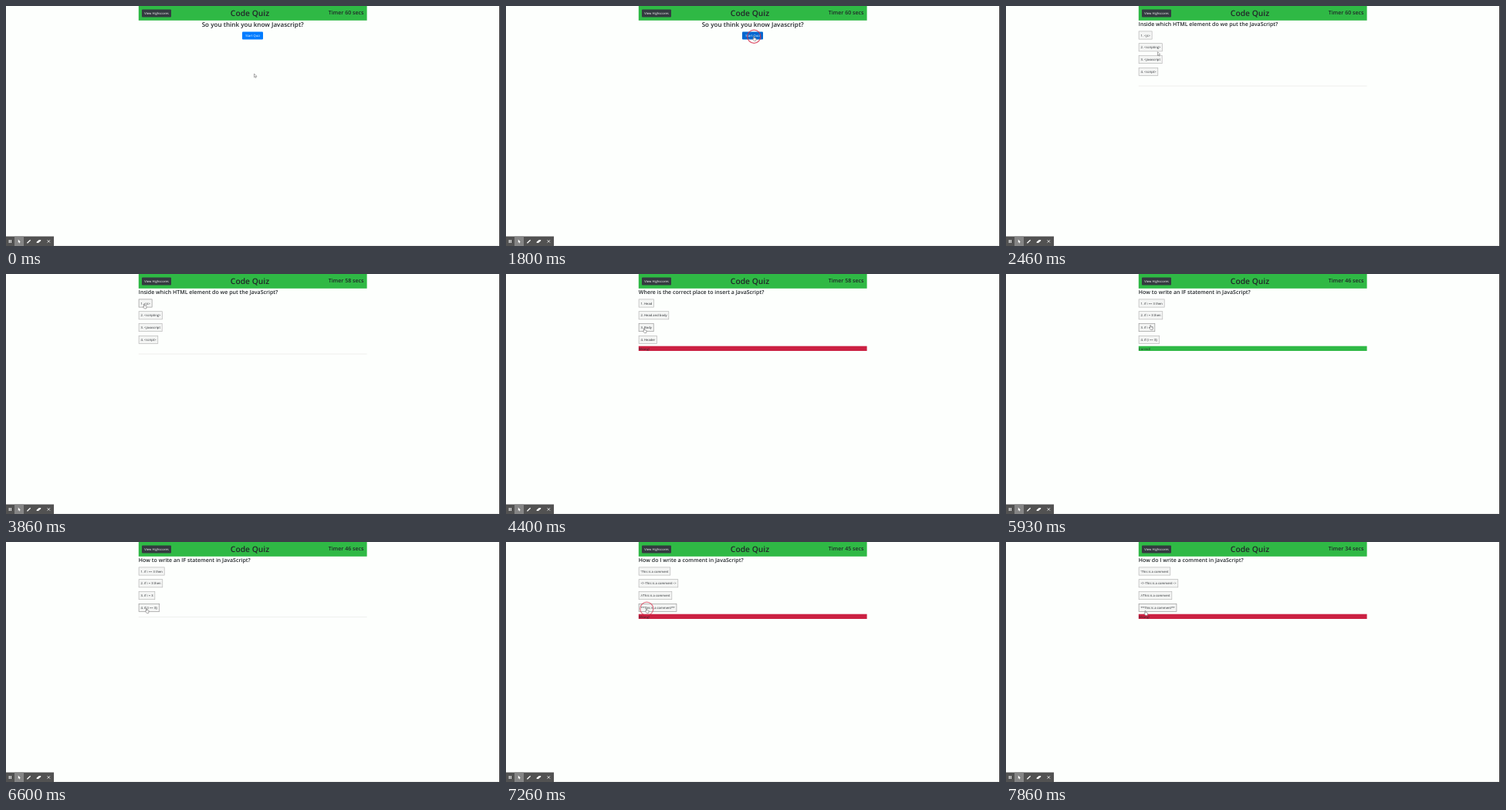
Recreate the animation shown at these times as an HTML page with a canvas. Size 640 by 312 pixels, loop 8000 ms.

```html
<!DOCTYPE html>
<html lang="en">
<head>
<meta charset="utf-8">
<title>Code Quiz</title>
<style>
html, body { margin: 0; width: 100%; height: 100%; overflow: hidden; background: #fdfffd; }
canvas { display: block; width: 640px; height: 312px; }
</style>
</head>
<body>
<canvas id="stage"></canvas>
<script>
const canvas = document.getElementById('stage');
const ctx = canvas.getContext('2d');
const ratio = window.devicePixelRatio || 1;
canvas.width = 640 * ratio;
canvas.height = 312 * ratio;

// Time is counted in ticks, 15 per second.
const RATE = 15;
const LOOP = 8 * RATE;
const LEFT = 171.8;
const WIDTH = 295.8;
const MID = 319.7;
const SMALL = 4.15;
const INK = '#212529';
const GREEN = '#2fb945';
const RED = '#cb2142';
const PAPER = '#fdfffd';

// Each page opens one tick after a click; "right" tells how that click was judged.
const pages = [
  { at: 0 },
  { at: 28, title: 'Inside which HTML element do we put the JavaScript?',
    choices: ['1. <js>', '2. <scripting>', '3. <javascript', '4. <script>'] },
  { at: 60, right: false, title: 'Where is the correct place to insert a JavaScript?',
    choices: ['1. Head', '2. Head and body', '3. Body', '4. Header'] },
  { at: 84, right: true, title: 'How to write an IF statement in JavaScript?',
    choices: ['1. if i == 3 then', '2. if i = 3 then', '3. if i = 3', '4. if (i == 3);'] },
  { at: 109, right: false, title: 'How do I write a comment in JavaScript?',
    choices: ["'This is a comment", '<!--This is a comment-->', '//This is a comment', '**This is a comment**'] }
];

const rowTop = i => 32.6 + 15.8 * i;
const rowMid = i => rowTop(i) + 6.6;

const moves = [
  { at: 0, len: 8, x: 321, y: 39.5 },
  { at: 29, len: 10, x: 182, y: 62 },
  { at: 39, len: 4, x: 179, y: rowMid(0) },
  { at: 60, len: 6, x: 179, y: rowMid(2) },
  { at: 72, len: 6, x: 190, y: rowMid(1) + 1 },
  { at: 85, len: 10, x: 182, y: rowMid(3) },
  { at: 109, len: 5, x: 180.5, y: rowMid(3) + 3 }
];

function pointerAt(n) {
  let x = 321.5, y = 88;
  for (const m of moves) {
    const u = Math.min(1, Math.max(0, (n - m.at) / m.len));
    const k = u * u * (3 - 2 * u);
    x += (m.x - x) * k;
    y += (m.y - y) * k;
  }
  return { x, y };
}

// One off per second; a penalty of ten shows at the next second.
function timeLeft(n) {
  const start = pages[1].at;
  const secs = Math.max(0, Math.floor((n - start) / RATE));
  const shown = start + secs * RATE;
  const wrong = pages.filter(p => p.right === false && p.at <= shown).length;
  return 60 - secs - 10 * wrong;
}

function rect(x, y, w, h, color) {
  ctx.fillStyle = color;
  ctx.fillRect(x, y, w, h);
}

function pill(x, y, w, h, color) {
  ctx.fillStyle = color;
  ctx.beginPath();
  ctx.roundRect(x, y, w, h, 1);
  ctx.fill();
}

// Fonts are set large and scaled down evenly, to keep fine letter spacing.
const ZOOM = 10;
function setFont(size, weight) {
  ctx.font = `${weight} ${size * ZOOM}px "Open Sans", "Noto Sans", sans-serif`;
}

function text(str, x, y, size, { weight = 400, align = 'left', color = INK } = {}) {
  ctx.save();
  ctx.translate(x, y);
  ctx.scale(1 / ZOOM, 1 / ZOOM);
  setFont(size, weight);
  ctx.textAlign = align;
  ctx.fillStyle = color;
  ctx.fillText(str, 0, 0);
  ctx.restore();
}

function textWidth(str, size) {
  setFont(size, 400);
  return ctx.measureText(str).width / ZOOM;
}

function trace(d, x, y, scale, fill, stroke) {
  ctx.save();
  ctx.translate(x, y);
  ctx.scale(scale, scale);
  const p = new Path2D(d);
  ctx.fillStyle = fill;
  ctx.fill(p);
  if (stroke) {
    ctx.lineWidth = 0.55 / scale;
    ctx.lineJoin = 'round';
    ctx.strokeStyle = stroke;
    ctx.stroke(p);
  }
  ctx.restore();
}

function line(x0, y0, x1, y1, width) {
  ctx.beginPath();
  ctx.moveTo(x0, y0);
  ctx.lineTo(x1, y1);
  ctx.lineWidth = width;
  ctx.strokeStyle = '#fff';
  ctx.stroke();
}

const inside = (p, x, y, w, h) => p.x >= x && p.x <= x + w && p.y >= y && p.y <= y + h;

function drawHeader(n) {
  rect(LEFT, 0, WIDTH, 18.8, GREEN);
  pill(176, 4.6, 38, 10, '#343a40');
  text('View Highscores', 195, 11.2, SMALL, { align: 'center', color: '#fff' });
  text('Code Quiz', 316, 12.6, 10.3, { weight: 600, align: 'center' });
  text(`Timer ${timeLeft(n)} secs`, 463.4, 11.1, 7.02, { weight: 600, align: 'right' });
}

function drawHome(pos) {
  text('So you think you know Javascript?', MID, 27.3, 8.1, { weight: 600, align: 'center' });
  const over = inside(pos, 306, 33.5, 27, 10);
  pill(306, 33.5, 27, 10, over ? '#0066d0' : '#007bff');
  text('Start Quiz', MID, 40.2, SMALL, { align: 'center', color: '#fff' });
  return over;
}

function drawChoice(label, i, pos) {
  const y = rowTop(i);
  const w = textWidth(label, SMALL) + 5.3;
  const over = inside(pos, LEFT, y, w, 10.8);
  rect(LEFT, y, w, 10.8, '#f4f5f4');
  ctx.strokeStyle = over ? '#8c8c8c' : '#b0b0b0';
  ctx.lineWidth = 0.6;
  ctx.strokeRect(LEFT + 0.3, y + 0.3, w - 0.6, 10.2);
  text(label, LEFT + 2.7, y + 6.9, SMALL);
  return over;
}

function drawQuestion(page, n, pos) {
  text(page.title, LEFT, 26.2, 7.02, { weight: 600 });
  const over = page.choices.map((c, i) => drawChoice(c, i, pos)).includes(true);
  const judged = 'right' in page;
  if (judged && n < page.at + RATE) {
    rect(LEFT, 93.7, WIDTH, 6.3, page.right ? GREEN : RED);
    text(page.right ? 'Correct!' : 'Wrong!', LEFT + 0.3, 98.5, SMALL);
  } else {
    rect(LEFT, judged ? 97 : 103.5, WIDTH, 1, '#eff0ee');
  }
  return over;
}

const ARROW = 'M0 0V4.7L1.1 3.8 1.9 5.4 2.7 5 1.9 3.5 3.4 3.4Z';
const HAND = 'M-.5 0H.5V2L2.7 2.4 3.1 3 2.7 5.8H.3L-1.5 3.6-1.1 2.9-.5 3.4Z';

function drawToolbar() {
  rect(62, 311, 577, 1, '#ebecea');
  rect(639, 0, 1, 312, '#3a3a3a');
  rect(0, 299.5, 62, 12.5, '#525252');
  rect(11, 299.5, 12, 12.5, '#858585');
  for (const x of [3.7, 5.8]) rect(x, 304, 1.1, 4, '#fff');
  trace(ARROW, 15.8, 303.6, 0.9, '#fff');
  line(27.4, 308.2, 31.6, 304.2, 1.3);
  trace('M0 2.7L3.2 0H5.6V1.3L2.3 4H0Z', 39.6, 304, 1, '#fff');
  for (const d of [-1.7, 1.7]) line(55.3 - d, 304.2, 55.3 + d, 307.6, 0.8);
}

function drawRing(n) {
  const page = pages.find(p => p.at && n >= p.at - 1 && n < p.at + 4);
  if (!page) return;
  const start = page.at - 1;
  const { x, y } = pointerAt(start);
  ctx.globalAlpha = 0.8 * (1 - (n - start) / 5);
  ctx.beginPath();
  ctx.arc(x + 0.3, y + 0.2, 8.6, 0, Math.PI * 2);
  ctx.lineWidth = 1.25;
  ctx.strokeStyle = '#d62f4b';
  ctx.stroke();
  ctx.globalAlpha = 1;
}

function draw(n) {
  ctx.setTransform(ratio, 0, 0, ratio, 0, 0);
  ctx.textRendering = 'geometricPrecision';
  rect(0, 0, 640, 312, PAPER);
  const pos = pointerAt(n);
  const page = pages.filter(p => p.at <= n).pop();
  drawHeader(n);
  const over = page.title ? drawQuestion(page, n, pos) : drawHome(pos);
  drawToolbar();
  drawRing(n);
  trace(over ? HAND : ARROW, pos.x, pos.y, 1, '#fff', '#666');
}

// The small lead keeps each step on the tick it rounds to.
function frame(now) {
  draw(Math.floor((now + 7) * RATE / 1000) % LOOP);
  requestAnimationFrame(frame);
}
draw(0);
requestAnimationFrame(frame);
</script>
</body>
</html>
```
